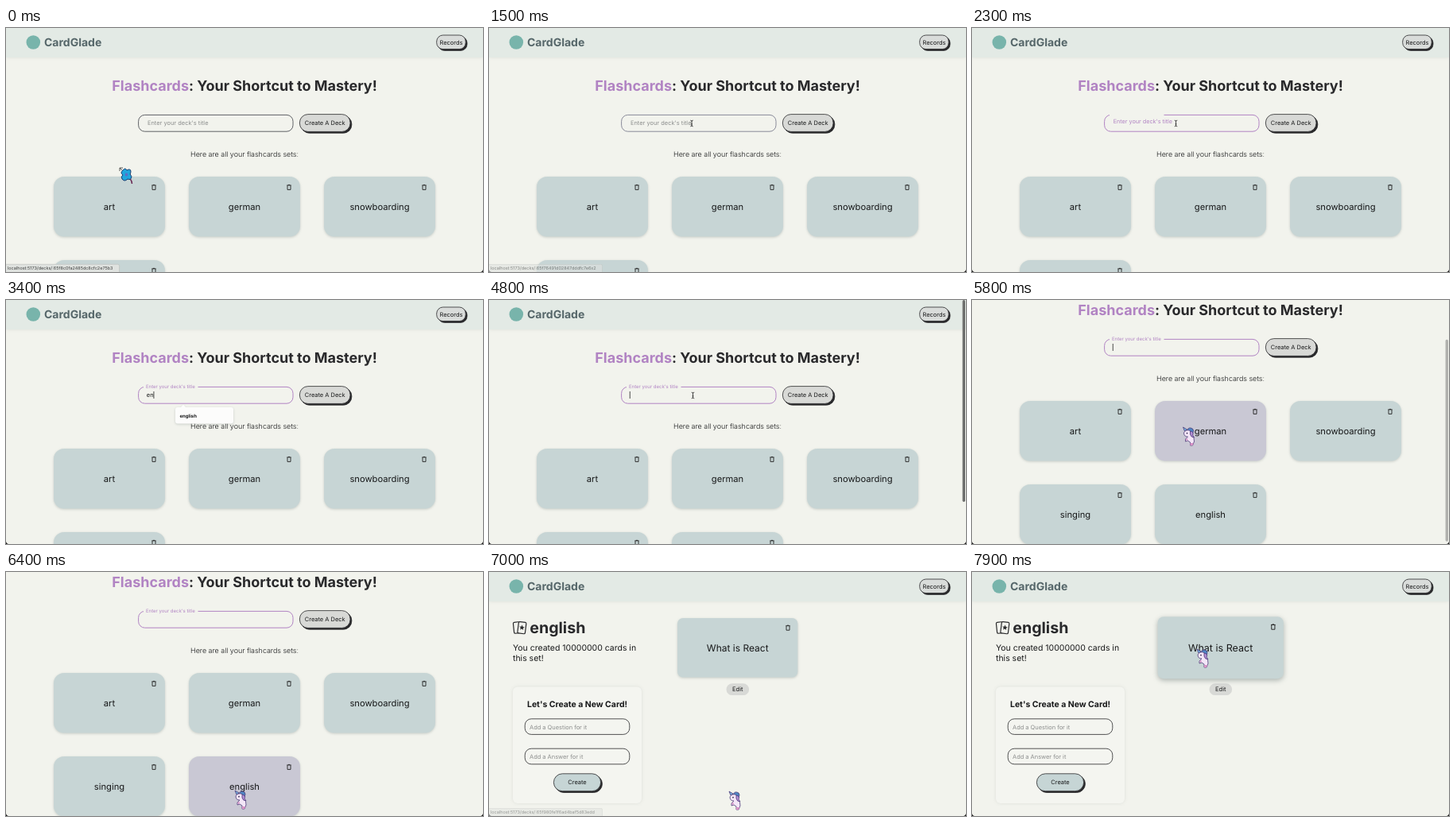
These frames come from a looping animation (600x307 px, 8000 ms). An HTML page:

```html
<!DOCTYPE html>
<html lang="en">
<head>
<meta charset="utf-8">
<title>Flashcard decks</title>
<style>
  html, body { margin: 0; width: 100%; height: 100%; overflow: hidden; background: #f2f3ed; }
  svg { display: block; width: 100%; height: 100%; }
  text { font-family: Inter, "Liberation Sans", sans-serif; font-optical-sizing: none; text-rendering: geometricPrecision; white-space: pre; }
  .soft { filter: drop-shadow(0 1px 1.6px rgba(40, 60, 60, .2)); }
  .faint { filter: drop-shadow(0 .5px 2px rgba(40, 60, 60, .1)); }
</style>
</head>
<body>
<svg id="stage" viewBox="0 0 600 307" preserveAspectRatio="none"></svg>
<script>
const LOOP = 8000, STEP = 100;
const INK = '#29292b', TEXT = '#18191a', PURPLE = '#b183c3', PAPER = '#f2f3ed', GREY = '#8d8f8e';
const CARD = [199, 213, 213], CARD_HOVER = [201, 200, 212];

const label = (x, y, size, str, { fill = TEXT, weight = 400, anchor = 'start', id = '' } = {}) =>
  `<text id="${id}" x="${x}" y="${y}" font-size="${size}" fill="${fill}" font-weight="${weight}" text-anchor="${anchor}">${str}</text>`;

const box = (x, y, w, h, r, attrs) =>
  `<rect x="${x}" y="${y}" width="${w}" height="${h}" rx="${r}" ${attrs}/>`;

const pillButton = (x, y, w, h, r, fill, str) =>
  box(x + 1.8, y + 1.8, w, h, r, `fill="${INK}" stroke="${INK}" stroke-width=".8"`) +
  box(x, y, w, h, r, `fill="${fill}" stroke="${INK}" stroke-width=".8"`) +
  label(x + w / 2, y + h / 2 + 2.7, 7.45, str, { anchor: 'middle' });

const trash = (x, y) =>
  `<g transform="translate(${x} ${y})" fill="none" stroke="#222" stroke-width=".9">
    <path d="M-2.7 -2.6H2.7M-1.1 -3.1H1.1M-2 -2.4V2.9H2V-2.4"/></g>`;

const deckCard = (id, x, y, name) =>
  `<g id="${id}">${box(x, y, 140, 75.5, 13, `class="soft" fill="rgb(${CARD})"`)}
    ${label(x + 70, y + 41.6, 11.2, name, { anchor: 'middle' })}${trash(x + 126, y + 13.5)}</g>`;

const field = (y, hint) =>
  box(45.2, y, 131.6, 19.6, 8, `fill="none" stroke="${INK}" stroke-width=".8"`) +
  label(51, y + 12.7, 7.45, hint, { fill: GREY });

const header = `
  <rect width="600" height="37" fill="#e3eae5" class="faint"/>
  <circle cx="34.3" cy="18" r="8.8" fill="#78b4ab"/>
  ${label(48, 23, 14, 'CardGlade', { fill: '#56676a', weight: 700 })}
  ${pillButton(541.7, 9, 36.5, 17.6, 8, '#d9dcda', 'Records')}`;

const listPage = `<g id="list">
  <text x="300" y="78.6" font-size="18" font-weight="700" text-anchor="middle" fill="${INK}"><tspan fill="${PURPLE}">Flashcards</tspan>: Your Shortcut to Mastery!</text>
  ${box(166.6, 109.4, 194.4, 20.8, 8, 'id="input" fill="none"')}
  <rect id="notch" x="173" y="107" width="68.5" height="5" fill="${PAPER}"/>
  ${label(0, 0, 7.45, "Enter your deck's title", { id: 'hint' })}
  ${label(176.8, 122.3, 7.45, '', { id: 'typed' })}
  <rect id="caret" y="115" width=".8" height="9" fill="#222"/>
  ${pillButton(369.4, 108.6, 63.6, 21.8, 10.4, '#d8d9d6', 'Create A Deck')}
  ${label(300, 162.3, 8.95, 'Here are all your flashcards sets:', { weight: 350, anchor: 'middle' })}
  ${deckCard('art', 60, 187, 'art')}
  ${deckCard('german', 230, 187, 'german')}
  ${deckCard('snow', 400, 187, 'snowboarding')}
  ${deckCard('singing', 60, 292, 'singing')}
  ${deckCard('english', 230, 292, 'english')}
  <g id="suggest" class="soft">
    <path d="M219.5 135.5L223 131.8L226.5 135.5Z" fill="#fcfcfb"/>
    ${box(213, 135, 73, 20.5, 3, 'fill="#fcfcfb"')}
    ${label(218.5, 147.6, 6, 'english', { weight: 700 })}
  </g></g>`;

const detailPage = `<g id="detail">
  <g stroke="${INK}" stroke-width="1.2" fill="${PAPER}" stroke-linejoin="round">
    <rect x="31" y="63" width="8" height="14" rx="1.5" transform="rotate(-6 35 70)"/>
    <g transform="rotate(7 41.5 70)">
      <rect x="36.6" y="63" width="9.6" height="14.4" rx="1.5"/>
      <path d="M41.4 66.6l1 2.2 2.3.2-1.8 1.5.6 2.3-2.1-1.2-2.1 1.2.6-2.3-1.8-1.5 2.3-.2z" fill="${INK}" stroke="none"/>
    </g>
  </g>
  ${label(51.3, 77, 19.6, 'english', { weight: 700, fill: INK })}
  ${label(30, 99.3, 10.47, 'You created 10000000 cards in')}
  ${label(30, 112, 10.47, 'this set!')}
  ${box(30, 144.5, 162, 146.5, 6, 'fill="#f4f5f0" class="faint"')}
  ${label(111, 169.8, 10.45, "Let's Create a New Card!", { weight: 700, anchor: 'middle' })}
  ${field(184.8, 'Add a Question for it')}
  ${field(222.2, 'Add a Answer for it')}
  ${pillButton(81.4, 253.8, 59.2, 21.9, 10.9, '#c6d5d5', 'Create')}
  ${box(298.5, 140.3, 28.6, 14.8, 7.4, 'fill="#d8d9d6"')}
  ${label(312.8, 150.3, 7.6, 'Edit', { anchor: 'middle' })}
  <g id="question">
    ${box(237, 58, 151.4, 74.5, 7, 'class="soft" fill="#c7d5d5"')}
    ${label(312.7, 99.7, 12, 'What is React', { anchor: 'middle' })}${trash(376, 70.3)}
  </g></g>`;

// Pointer hot spots are at (0, 0)
const pointers = `
  <g id="flower" stroke-linejoin="round">
    <path d="M9 12Q15 13 15.5 20" fill="none" stroke="#6b2b55" stroke-width="1.5"/>
    <path d="M4 3Q7 -1 9 3Q14 0 14 5Q12 8 15 11Q14 16 10 14Q6 18 3 14Q1 11 4 9Q0 6 4 3Z" fill="#22a5dc" stroke="#1b3d70" stroke-width="1"/>
    <circle cx="8.5" cy="8.5" r="1.9" fill="#5c6fc6"/>
    <path d="M0 4V0H4M0 0L3 3" fill="none" stroke="#333" stroke-width=".8"/>
  </g>
  <g id="unicorn" stroke="#4c3a78" stroke-width=".8" stroke-linejoin="round">
    <path d="M5 4Q7 -1 12 2Q14 4 12 8L8 7Z" fill="#4f86c4"/>
    <path d="M0 0L5 3L2 5Z" fill="#77b9e8"/>
    <path d="M1 7Q3 3 8 4Q12 6 10 10Q15 13 14 18L12 23H9L9 19L6 17L3 18L3 15L6 12Q1 12 1 7Z" fill="#f3e6f7"/>
    <path d="M9 5Q14 6 12 10L14 13Q10 13 9 9Z" fill="#b48fd6"/>
    <path d="M3 15L6 14L5 17.5ZM9 20H13L12 23H9Z" fill="#d992c6" stroke="none"/>
    <circle cx="5" cy="7.6" r=".9" fill="#33264d" stroke="none"/>
  </g>
  <path id="beam" d="M-1.7 -3.8Q0 -3.8 0 -2.6Q0 -3.8 1.7 -3.8M0 -3V3M-1.7 3.8Q0 3.8 0 2.6Q0 3.8 1.7 3.8M-1 .9H1" fill="none" stroke="#222" stroke-width=".8"/>`;

const stage = document.getElementById('stage');
stage.innerHTML = `<rect width="600" height="307" fill="${PAPER}"/>
  <g id="page">${listPage}${detailPage}${header}</g>
  ${box(595.6, 0, 3.4, 254, 1.7, 'id="thumb" fill="#6d6e6d"')}
  <path d="M0 303.5Q.3 306.7 3.5 307H0ZM600 303.5Q599.7 306.7 596.5 307H600Z" fill="#111"/>
  <g id="status">
    ${box(-3, 297.3, 145.6, 13, 2, 'fill="#dfe2df" stroke="#b9bcb9" stroke-width=".6"')}
    ${label(2, 304.2, 5.48, '', { id: 'url', fill: '#3b3d3c' })}
  </g>${pointers}`;

const ui = {};
stage.querySelectorAll('[id]').forEach(el => { if (el.id) ui[el.id] = el; });

const clamp = v => Math.max(0, Math.min(1, v));
const ramp = (t, from, to) => clamp((t - from) / (to - from));
const ease = p => p * p * (3 - 2 * p);
const mix = (a, b, p) => a + (b - a) * p;
const blend = (a, b, p) => `rgb(${a.map((v, i) => Math.round(mix(v, b[i], p)))})`;
const show = (el, on) => el.setAttribute('visibility', on ? 'visible' : 'hidden');
const fade = (el, opacity) => el.setAttribute('opacity', opacity);

const HOVER = 1500, FOCUS = 2250, SUBMIT = 4400, OPEN = 6900;
const WORD = 'english', KEYS = [3300, 3400, 3600, 3700, 3900, 4000, 4100];

// time, x, y; a fourth value holds the pose until the next point
const PATH = [
  [0, 143, 176], [100, 178, 156], [200, 209, 140, 1], [1500, 255, 120], [2200, 256.5, 120],
  [5600, 256.5, 120], [5900, 270, 180], [6100, 282, 245], [6300, 288, 275],
  [6700, 288, 275], [7000, 302, 276], [7200, 303, 262], [7500, 297, 135], [7800, 284, 100], [7900, 283, 97]
];

function pointerAt(t) {
  const next = PATH.findIndex(p => p[0] > t);
  if (next < 0) return PATH[PATH.length - 1].slice(1, 3);
  const a = PATH[next - 1], b = PATH[next];
  const p = a[3] ? 0 : ramp(t, a[0], b[0]);
  return [mix(a[1], b[1], p), mix(a[2], b[2], p)];
}

function pointerKind(t, y) {
  if (t < HOVER) return 'flower';
  if (t < 3300) return 'beam';
  if (t < 4700) return '';
  if (t < 5700) return 'beam';
  const betweenCards = y < 127 || (y > 202 && y < 232);
  return t < OPEN && betweenCards ? 'flower' : 'unicorn';
}

function drawInput(t) {
  const p = ease(ramp(t, FOCUS, FOCUS + 200)), focused = t >= FOCUS;
  const count = t < SUBMIT ? KEYS.filter(k => k <= t).length : 0;
  ui.input.setAttribute('stroke', focused ? PURPLE : t >= HOVER ? '#6f7084' : '#3a3d44');
  ui.input.setAttribute('stroke-width', focused ? 1 : .8);
  show(ui.notch, focused && t < OPEN);
  ui.hint.setAttribute('x', mix(178, 176, p));
  ui.hint.setAttribute('y', mix(122.2, 111.1, p));
  ui.hint.setAttribute('font-size', mix(7.45, 6, p));
  ui.hint.setAttribute('fill', focused ? PURPLE : GREY);
  ui.typed.textContent = WORD.slice(0, count);
  ui.caret.setAttribute('x', 176.8 + (count ? ui.typed.getComputedTextLength() : 0));
  show(ui.caret, focused && t < OPEN && (count > 0 || (t + 200) % 1000 < 500));
  show(ui.suggest, count > 0);
}

function drawStatus(t) {
  const ids = { first: '65f8c0fa2485dc8cfc2e75b3', second: '65f76491d02847dddfc7e6x2', third: '65f980fe1f6ad4baf5d83edd' };
  const id = t < 100 ? ids.first : t < OPEN ? ids.second : ids.third;
  ui.url.textContent = 'localhost:5173/decks/:' + id;
  const leaving = t < OPEN ? .6 * (1 - ramp(t, HOVER, HOVER + 200)) : 1 - ramp(t, 6800, 7200);
  fade(ui.status, t < HOVER ? 1 : leaving);
}

function update(t) {
  const opened = t >= OPEN;
  const scroll = opened ? 0 : 60 * (1 - (1 - ramp(t, 4800, 5600)) ** 3);
  ui.page.setAttribute('transform', `translate(0 ${-scroll})`);
  show(ui.list, !opened);
  show(ui.detail, opened);
  show(ui.english, !opened && t >= SUBMIT);
  ui.thumb.setAttribute('y', scroll * .83);
  fade(ui.thumb, t >= 4700 ? 1 - ramp(t, 5700, 5900) : 0);
  drawInput(t);

  const tint = (el, p) => el.firstElementChild.setAttribute('fill', blend(CARD, CARD_HOVER, p));
  tint(ui.german, ramp(t, 5600, 5800) * (1 - ramp(t, 6000, 6200)));
  tint(ui.english, ramp(t, 6000, 6300));

  const lift = ease(ramp(t, 7450, 7850)), s = 1 + .045 * lift;
  ui.question.setAttribute('transform', `translate(312.8 95.3) scale(${s}) translate(-312.8 -95.3)`);
  ui.question.firstElementChild.style.filter =
    `drop-shadow(0 ${1 + lift}px ${1.6 + lift * 1.4}px rgba(40,60,60,${.2 + .15 * lift}))`;

  drawStatus(t);
  const [x, y] = pointerAt(t), kind = pointerKind(t, y);
  for (const name of ['flower', 'unicorn', 'beam']) {
    ui[name].setAttribute('transform', `translate(${x} ${y})`);
    show(ui[name], name === kind);
  }
}

const start = performance.now();
function frame() {
  const t = (performance.now() - start) % LOOP;
  update(Math.floor(t / STEP) * STEP);
  requestAnimationFrame(frame);
}
update(0);
requestAnimationFrame(frame);
</script>
</body>
</html>
```
